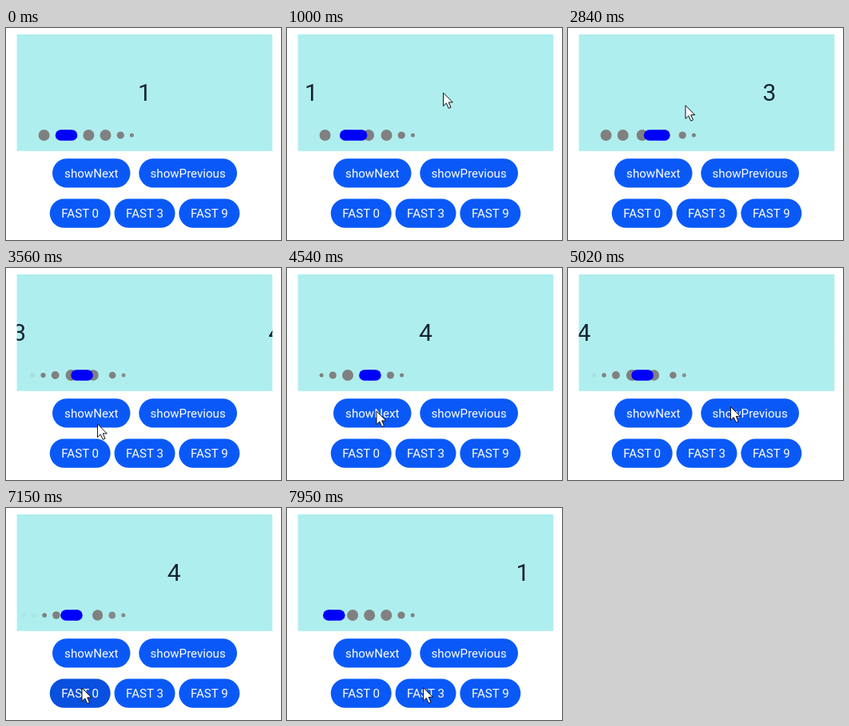
An HTML page for the animation above (7990 ms loop, 344 px wide and 265 px high).

```html
<!DOCTYPE html>
<html>
<head>
<meta charset="utf-8">
<style>
html, body { margin: 0; width: 100%; height: 100%; overflow: hidden; background: #fff; }
svg { display: block; width: 100vw; height: 100vh; }
text { text-anchor: middle; font-family: Roboto, Inter, sans-serif; }
.page { font-size: 30px; fill: #182431; }
.label { font-size: 15.1px; fill: #fff; }
</style>
</head>
<body>
<svg viewBox="0 0 344 265">
  <defs><clipPath id="panel"><rect x="13.6" y="8" width="319.7" height="145.8"/></clipPath></defs>
  <rect x="13.6" y="8" width="319.7" height="145.8" fill="#afeeee"/>
  <g id="pages" clip-path="url(#panel)"></g>
  <g id="dots" fill="#808080"></g>
  <rect id="bar" y="127.2" height="13.6" rx="6.8" fill="#00f"/>
  <g id="buttons"></g>
  <path id="cursor" d="M0 0V16.6L3.8 13L6.7 19.4L9.5 18.2L6.7 11.9H11.8Z"
    fill="#fff" stroke="#111" stroke-width="1"/>
</svg>
<script>
const LOOP = 7990, SLIDE = 980, PRESS = 120;
const PAGE_W = 320, MID = 173.5, COUNT = 10;
const SLOTS = 6, GAP = 7.1, ROW_LEFT = 40.6, HALF_BAR = 13.8;
const $ = id => document.getElementById(id);
const lerp = (a, b, t) => a + (b - a) * t;
const clamp = t => Math.max(0, Math.min(1, t));

function set(el, attrs) {
  for (const k in attrs) el.setAttribute(k, attrs[k]);
}
function add(parent, tag, attrs, text = "") {
  const el = document.createElementNS(parent.namespaceURI, tag);
  set(el, attrs);
  el.textContent = text;
  return parent.appendChild(el);
}

// Dots shrink towards an end of the row that hides more pages.
function radius(slot, first) {
  const edge = Math.min(SLOTS - 1 - slot, first > 0 ? slot : SLOTS);
  return edge <= 0 ? 2.5 : edge === 1 ? 4.6 : 7;
}

// A row of six slots that starts at page `first`, with the bar on page `n`.
function layout(n, first) {
  const half = i => i === n ? HALF_BAR : radius(i - first, first);
  const dots = [];
  let x = ROW_LEFT - first * (GAP + 5);
  for (let i = 0; i < COUNT; i++) {
    if (i === first) x = ROW_LEFT;
    const slot = i - first;
    dots.push({ x: x + half(i), r: radius(slot, first), a: +(slot >= 0 && slot < SLOTS) });
    x += 2 * half(i) + GAP;
  }
  return { n, dots };
}

const swipe = p => p * p;
const easeOut = p => 1 - (1 - p) ** 3;
const easeSoft = p => 1 - (1 - p) ** 1.6;
const moves = [
  { t: 562, n: 2, first: 0, ease: swipe },
  { t: 2100, n: 3, first: 0, ease: swipe },
  { t: 3080, n: 4, first: 1, ease: easeOut },
  { t: 4550, n: 5, first: 2, ease: easeOut, press: "showNext" },
  { t: 5803, n: 4, first: 2, ease: easeSoft, press: "showPrevious" },
  { t: 7122, n: 0, first: 0, ease: easeOut, press: "FAST 0" }
];
let last = layout(1, 0);
for (const m of moves) {
  m.from = last;
  m.to = last = layout(m.n, m.first);
}

// Pointer stops: time, x, y
const path = [
  [200, 207, 164], [560, 205, 84], [1000, 195.5, 81], [2120, 150, 87],
  [3080, 146, 100], [3560, 114.5, 195], [4040, 112, 179], [4660, 112, 179],
  [5020, 203.5, 173.5], [5540, 216, 177.5], [6140, 215.5, 177.5],
  [6780, 95, 225], [7300, 95, 225], [7850, 170.5, 224.5], [LOOP, 170.5, 224.5]
];

const buttons = {};
function addRow(y, gap, specs) {
  let x = MID - (specs.reduce((sum, s) => sum + s[1], 0) + gap * (specs.length - 1)) / 2;
  for (const [text, width] of specs) {
    buttons[text] = add($("buttons"), "rect", { x, y, width, height: 36.4, rx: 18.2 });
    add($("buttons"), "text", { class: "label", x: x + width / 2, y: y + 23.7 }, text);
    x += width + gap;
  }
}
addRow(163.2, 10.8, [["showNext", 97.5], ["showPrevious", 122.7]]);
addRow(213.4, 4.8, ["FAST 0", "FAST 3", "FAST 9"].map(s => [s, 76]));

const pages = Array.from({ length: COUNT }, (_, i) => add($("pages"), "text", { class: "page", y: 91 }, i));
const dots = Array.from({ length: COUNT }, () => add($("dots"), "circle", { cy: 134 }));

function drawSwiper(t) {
  const { t: begin, from, to, ease } = moves.findLast(m => t >= m.t) || moves[0];
  const p = clamp((t - begin) / SLIDE), q = ease(p);
  const at = lerp(from.n, to.n, p);
  pages.forEach((el, i) => set(el, { x: MID + (i - at) * PAGE_W }));

  const now = from.dots.map((a, i) => {
    const b = to.dots[i];
    return { x: lerp(a.x, b.x, q), r: lerp(a.r, b.r, q), a: lerp(a.a, b.a, q) };
  });
  dots.forEach((el, i) => set(el, { cx: now[i].x, r: now[i].r, opacity: now[i].a }));

  // Neighbours share the moving dots; a long jump goes straight.
  const far = Math.abs(to.n - from.n) > 1;
  const x0 = (far ? from.dots : now)[from.n].x;
  const x1 = (far ? to.dots : now)[to.n].x;
  const left = lerp(x0, x1, ease === swipe ? q : p) - HALF_BAR;
  const right = lerp(x0, x1, p) + HALF_BAR;
  set($("bar"), { x: left, width: right - left });
}

function drawCursor(t) {
  const k = path.findIndex(stop => stop[0] > t);
  $("cursor").style.display = k > 0 ? "" : "none";
  if (k < 1) return;
  const a = path[k - 1], b = path[k], u = (t - a[0]) / (b[0] - a[0]);
  set($("cursor"), { transform: `translate(${lerp(a[1], b[1], u)} ${lerp(a[2], b[2], u)})` });
}

function drawButtons(t) {
  const held = moves.find(m => t >= m.t && t < m.t + PRESS);
  for (const text in buttons)
    set(buttons[text], { fill: held && held.press === text ? "#0950de" : "#0a59f7" });
}

function draw(t) {
  drawSwiper(t);
  drawCursor(t);
  drawButtons(t);
}

let start;
function tick(now) {
  start ??= now;
  draw((now - start) % LOOP);
  requestAnimationFrame(tick);
}
draw(0);
requestAnimationFrame(tick);
</script>
</body>
</html>
```
